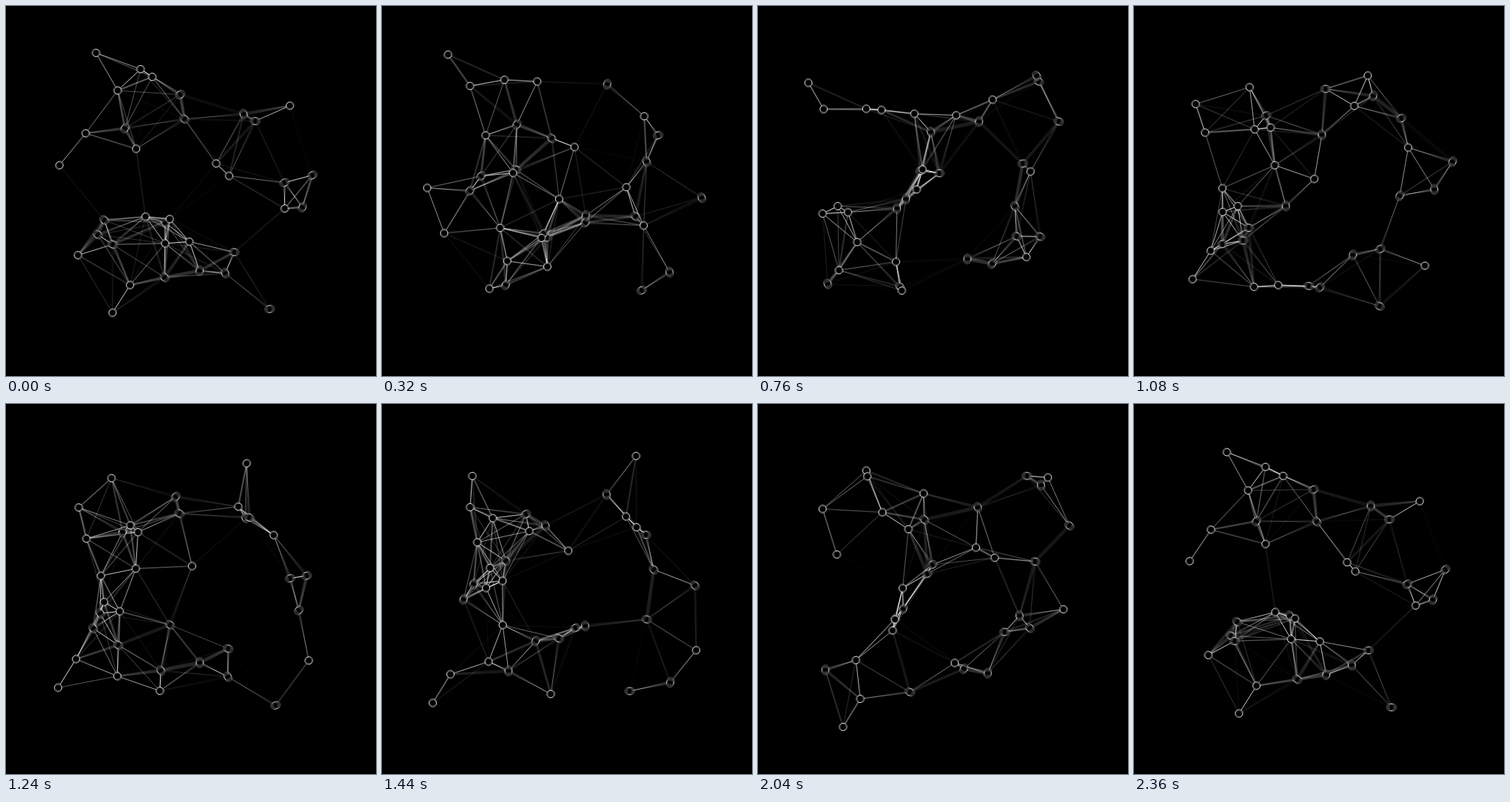
Write an HTML page with a canvas that moves like this. It is 500x500 px and loops after 2.4 s.

```html
<!DOCTYPE html>
<html lang="en">
<head>
<meta charset="utf-8">
<title>Orbiting network</title>
<style>
  html, body { margin: 0; width: 100%; height: 100%; overflow: hidden; background: #000; }
  canvas { display: block; }
</style>
</head>
<body>
<canvas id="stage" width="500" height="500"></canvas>
<script>
const SIZE = 500, FRAMES = 60, FRAME_MS = 40, TAU = 2 * Math.PI;
const ORBIT = 40, NODE = 5, REACH = 102;
const SAMPLES = 5, SHUTTER = 0.6;

// Every node circles its own centre: [centre x, centre y, start angle in degrees]
const orbit = (turns, ...starts) => starts.map(([x, y, degrees]) => phase => {
  const angle = degrees * TAU / 360 + turns * phase * TAU;
  return [x + ORBIT * Math.cos(angle), y + ORBIT * Math.sin(angle)];
});

const nodes = [
  ...orbit(-2, [259, 152, -126], [215, 183, -49], [196, 184, -152], [360, 137, 167],
    [245, 266, 138], [222, 353, 7], [334, 348, 161], [350, 370, 81]),
  ...orbit(2, [343, 116, 99], [394, 194, 60], [395, 274, -118], [366, 252, 30],
    [160, 260, 133], [148, 277, 127], [131, 360, -71], [314, 293, 98], [243, 339, 136]),
  ...orbit(-1, [108, 101, -70], [186, 134, -73], [128, 147, -55], [213, 208, -158],
    [127, 137, 119], [101, 243, -136], [333, 205, 142], [391, 311, -111],
    [200, 254, 58], [226, 352, -57], [132, 359, 27], [108, 397, 26]),
  ...orbit(1, [177, 125, -83], [353, 109, 40], [297, 175, 109], [157, 260, 38],
    [124, 307, 132], [184, 346, -39])
];

const stage = document.getElementById('stage').getContext('2d');
const layer = document.createElement('canvas');
layer.width = layer.height = SIZE;
const ctx = layer.getContext('2d');
ctx.lineWidth = 1;

function drawLink([x1, y1], [x2, y2]) {
  const closeness = 1 - (Math.hypot(x2 - x1, y2 - y1) / REACH) ** 2;
  if (closeness <= 0) return;
  ctx.strokeStyle = `rgba(255,255,255,${closeness})`;
  ctx.beginPath();
  ctx.moveTo(x1, y1);
  ctx.lineTo(x2, y2);
  ctx.stroke();
}

function drawNode([x, y]) {
  ctx.strokeStyle = '#fff';
  ctx.beginPath();
  ctx.arc(x, y, NODE, 0, TAU);
  ctx.fill();
  ctx.stroke();
}

function drawNetwork(phase) {
  const points = nodes.map(node => node(phase));
  ctx.fillStyle = '#000';
  ctx.fillRect(0, 0, SIZE, SIZE);
  points.forEach((point, i) => points.slice(i + 1).forEach(other => drawLink(point, other)));
  points.forEach(drawNode);
}

// Motion blur: average several moments around the frame
function drawFrame(frame) {
  for (let i = 0; i < SAMPLES; i++) {
    const offset = (i - (SAMPLES - 1) / 2) * SHUTTER / SAMPLES;
    drawNetwork((frame + offset) / FRAMES);
    stage.globalAlpha = 1 / (i + 1);
    stage.drawImage(layer, 0, 0);
  }
}

let shown = -1;
function tick() {
  const frame = Math.floor(performance.now() / FRAME_MS) % FRAMES;
  if (frame !== shown) drawFrame(shown = frame);
  requestAnimationFrame(tick);
}
tick();
</script>
</body>
</html>
```
